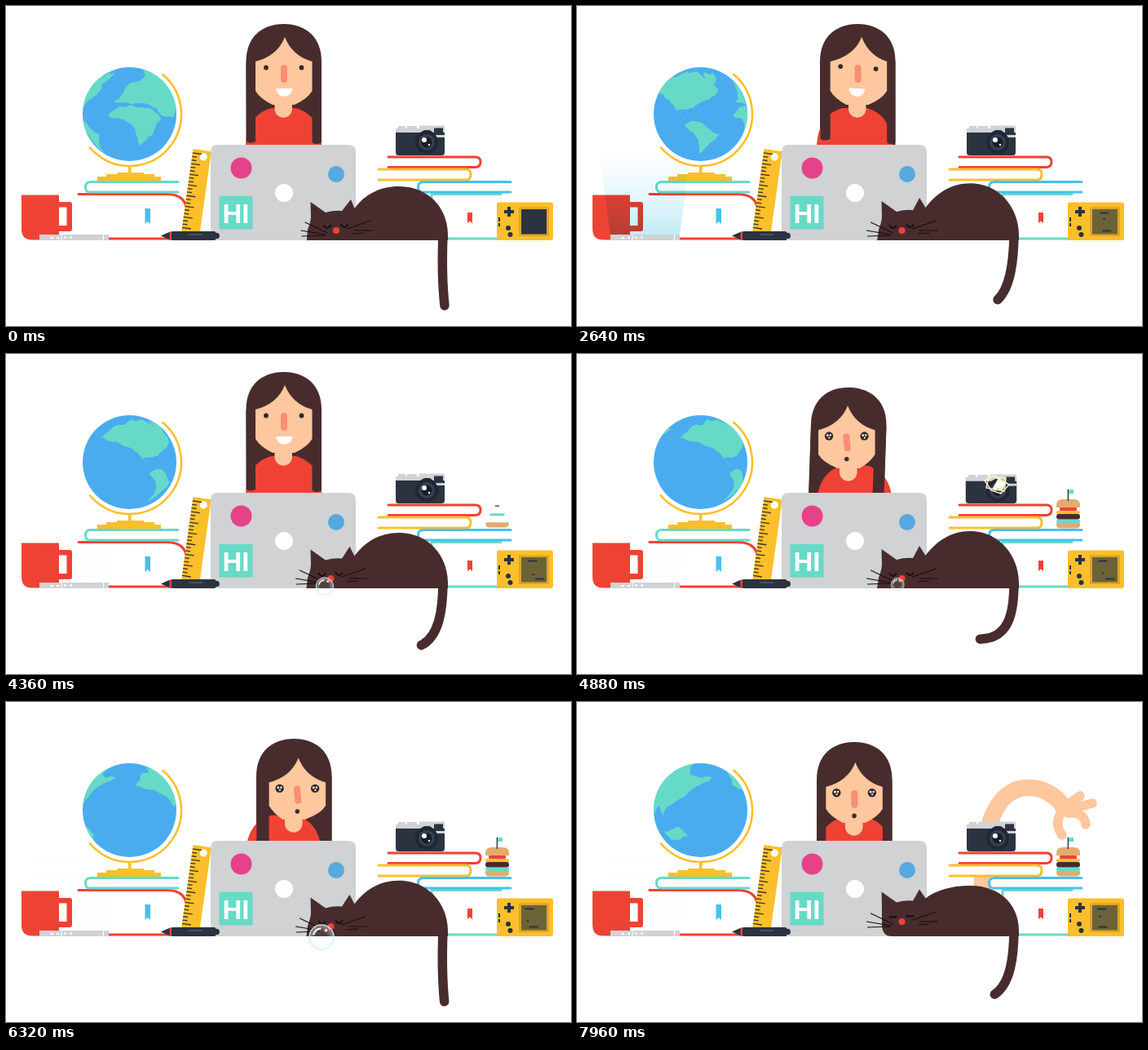
An HTML page for the animation above (8 s loop, 693 px wide and 392 px high).

```html
<!DOCTYPE html>
<html lang="en">
<head>
<meta charset="utf-8">
<title>Desk</title>
<style>
html, body { margin: 0; height: 100%; overflow: hidden; background: #fff; }
svg { display: block; width: 100vw; height: 100vh; }
.red { fill: #ef4234 } .teal { fill: #67dac7 } .gold { fill: #fbbf2b }
.ink { fill: #2b3341 } .grey { fill: #d0d2d4 } .hair { fill: #482c2d }
.skin { fill: #fec79d } .bun { fill: #e4ab6e } .white { fill: #fff }
.book { fill: #fff; stroke-width: 3; stroke-linecap: round }
.limb { fill: none; stroke: #fec79d; stroke-linecap: round; stroke-linejoin: round }
.line { fill: none; stroke: #150d0f; stroke-width: 1.1; stroke-linecap: round }
.lid { stroke-width: 2 }
#beam { mix-blend-mode: multiply }
</style>
</head>
<body>
<svg viewBox="0 0 693 392">
  <defs>
    <linearGradient id="glow" x1="0" y1="0" x2="0" y2="1">
      <stop offset="0" stop-color="#d8f3fb" stop-opacity="0"/>
      <stop offset=".5" stop-color="#cdeffa" stop-opacity=".5"/>
      <stop offset="1" stop-color="#b9e8f6" stop-opacity=".85"/>
    </linearGradient>
    <radialGradient id="film">
      <stop offset=".45" stop-color="#fff" stop-opacity=".08"/>
      <stop offset="1" stop-color="#e4f6fb" stop-opacity=".5"/>
    </radialGradient>
    <clipPath id="above"><path d="M400 0H693V229H400Z"/></clipPath>
  </defs>

  <!-- globe -->
  <circle cx="151.5" cy="132.5" r="57.5" fill="#4aacee"/>
  <path id="land" class="teal" transform="translate(151.5 132.5)"/>
  <circle r="63.5" transform="translate(151.5 132.5) rotate(-51)" pathLength="360" stroke-dasharray="192 168" fill="none" stroke="#fbbf2b" stroke-width="2.6"/>
  <path class="gold" d="M150 196H153.500V204H169V206H182V209H190V214H112V209H123V206H136V204H150Z"/>

  <!-- left books -->
  <path class="book" stroke="#ef4234" d="M89 230.500H198Q222 231 222 254V270Q222 285 200 285H44"/>
  <path class="book" stroke="#67dac7" d="M211 215.500H104Q97.500 215.500 97.500 222T104 228H211"/>
  <path fill="#45c1ef" d="M170.500 248H177V267L173.700 264L170.500 267Z"/>

  <!-- arm -->
  <g clip-path="url(#above)"><g id="arm">
    <path class="limb" stroke-width="20.500" d="M495 280L497 215Q499 168 507 146C517 118 533 105 553 105C574 105 588 115 598 130"/>
    <path class="limb" stroke-width="11.500" d="M597 129L617 115M602 132L632 124M596 132Q584 148 595 163M602 136Q622 134 624 150"/>
  </g></g>

  <!-- right books -->
  <path class="book" stroke="#67dac7" d="M607 230.500H522V285H607"/>
  <path class="book" stroke="#ef4234" d="M469 185H576Q582 185 582 191T576 197.500H469"/>
  <path class="book" stroke="#fbbf2b" d="M457 200H564Q570 200 570 206.500T564 213H457"/>
  <path class="book" stroke="#45c1ef" d="M619 215.500H512Q505.500 215.500 505.500 222T512 228H619"/>
  <path class="red" d="M566 253H572V266L569 263.500L566 266Z"/>

  <!-- camera -->
  <g id="camera">
    <path class="grey" d="M478 150H481V147H490V150H492V147H504V150H507V146.500H538V183H478Z"/>
    <path class="ink" d="M478 155H508L513 152H520L524 155H538V179Q538 183 534 183H482Q478 183 478 179ZM525 149.500H536V158H525Z"/>
    <path class="grey" d="M524 158H538V161H524Z"/>
    <circle cx="516" cy="167" r="14" fill="#1f2733"/>
    <circle cx="516" cy="167" r="10" fill="#36404f"/>
    <circle cx="516" cy="167" r="6.500" fill="#171d27"/>
    <circle class="white" cx="513" cy="164" r="3"/>
    <circle class="white" cx="519" cy="170" r="1.200"/>
  </g>
  <g id="flash" fill="none" stroke="#fdeec9" stroke-width="1.500">
    <path d="M500 155L512 149L530 160L520 171L508 167Z"/>
    <path d="M505 150L526 152L524 168L502 164Z"/>
    <path d="M517 153L526 158L521 167L512 162Z" fill="#fff"/>
  </g>

  <!-- burger -->
  <g id="burger">
    <path class="bun" d="M588 207H617V209Q617 213.500 612 213.500H593Q588 213.500 588 209Z"/>
    <rect class="teal" x="588" y="202.500" width="29" height="4.500" rx="2"/>
    <rect class="hair" x="588" y="196" width="29" height="6.500" rx="3"/>
    <rect class="gold" x="588" y="192" width="29" height="4" rx="1.500"/>
    <rect class="red" x="592" y="188" width="21" height="4" rx="1"/>
    <path class="bun" d="M588 188V185Q588 178 596 178H609Q617 178 617 185V188Z"/>
    <path class="teal" d="M602 166H609V171H603.300V179H602Z"/>
    <path class="ink" d="M601.700 166H603V180H601.700Z"/>
  </g>

  <!-- handheld game -->
  <path class="gold" d="M604 240.500H669Q671 240.500 671 243V284Q671 287 668 287H602V243Q602 240.500 604 240.500Z"/>
  <path fill="#dba626" d="M629 246.500H666V282H629Z"/>
  <path id="screen" class="ink" d="M632 249H663V279.500H632Z"/>
  <g id="game" class="ink">
    <rect y="252.500" width="11" height="2"/>
    <rect y="274.500" width="11" height="2"/>
    <rect width="2.500" height="2"/>
  </g>
  <path class="ink" d="M615 246H619V250H623V254H619V258H615V254H611V250H615ZM604 259H606V264H604ZM604 266H606V270H604Z"/>
  <circle class="ink" cx="616" cy="272" r="3"/><circle class="ink" cx="618.500" cy="280" r="3"/>

  <!-- mug, projector -->
  <path class="red" d="M19 231.500H65V240H78Q81 240 81 243V273Q81 276 78 276H65V286.500H32Q19 286.500 19 273ZM65 246.500V269H74.500V246.500Z"/>
  <path id="beam" fill="url(#glow)" d="M27 182H139L126 280H41Z"/>
  <path class="grey" d="M41 280H126V287H41Z"/>
  <path class="white" d="M67.500 280H68.500V287H67.500ZM119 280H120V287H119ZM54 283H58V285H54ZM62 283H65V285H62ZM71 282.500H74V284.500H71ZM78 282.500H81V284.500H78Z"/>

  <!-- ruler -->
  <g transform="translate(229.500 175) rotate(8)">
    <path class="gold" d="M0 0H22.500V102H0Z"/>
    <circle class="white" cx="14" cy="8" r="4.600"/>
    <path id="ticks" fill="none" stroke="#3b302b" stroke-width="1.300"/>
  </g>

  <!-- woman -->
  <path id="back" class="hair" d="M294.500 185V68C294.500 38 314 22 340.700 22S387 38 387 68V185Z"/>
  <path id="shirt" class="red" d="M294 200V172C295 146 306 130 326 125H355C375 130 386 146 387 172V200Z"/>
  <path id="neck" class="skin" d="M329.500 98H351V126A10.750 10.750 0 0 1 329.500 126Z"/>
  <path id="strands" class="hair"/>
  <path id="skin" class="skin"/>
  <g id="face">
    <g id="dots" fill="#33292c"><circle cx="319" cy="75.500" r="2.900"/><circle cx="362.500" cy="75.500" r="2.900"/></g>
    <path id="happy" fill="none" stroke="#33292c" stroke-width="2.200" stroke-linecap="round" d="M313.500 78C314 70 324 70 324.500 78M357 78C357.500 70 367.500 70 368 78"/>
    <g id="wide"></g>
    <rect id="nose" x="337" y="72" width="8" height="22" rx="4" fill="#f98d76"/>
    <path id="smile" class="white" d="M331.500 101H351C351 114 331.500 114 331.500 101Z"/>
    <circle id="gasp" cx="340.700" cy="103.500" r="2.800" fill="#482c2d"/>
  </g>

  <!-- laptop -->
  <path class="grey" d="M251 287V179Q251 170 260 170H420Q429 170 429 179V287Z"/>
  <circle cx="288.500" cy="198.500" r="13" fill="#e6428a"/>
  <circle cx="405" cy="206" r="10" fill="#55a9de"/>
  <circle class="white" cx="341" cy="229" r="11"/>
  <path class="teal" d="M261.500 233H302.500V273.500H261.500Z"/>
  <text x="282" y="265.500" text-anchor="middle" class="white" font-family="'Liberation Sans', Arial, sans-serif" font-weight="700" font-size="33">HI</text>

  <!-- marker -->
  <path class="ink" d="M190 281.500L200 277L205 276H256L258 278H260Q262 279 262 281.500T260 285H258L256 287H205L200 286Z"/>
  <path class="red" d="M200.500 276.800H203V286.600H200.500Z"/>
  <path fill="#465061" d="M224 279H241V281H224Z"/>

  <!-- cat -->
  <path id="tail" fill="none" stroke="#482c2d" stroke-width="11.500" stroke-linecap="round"/>
  <path id="cat" class="hair"/>
  <g id="muzzle">
    <path class="line" d="M-43 0L-14 5M-38-10L-11 3M-42 7L-14 6M13-2L42-12M22 0H44M20 4L33 3"/>
    <path id="lids" class="line lid"/>
    <circle class="red" r="4"/>
  </g>
  <g id="bubble">
    <circle r="1" fill="url(#film)" stroke="#c9edf7" stroke-width=".08"/>
    <path d="M-.65-.25Q-.5-.65-.1-.7" fill="none" stroke="#fff" stroke-width=".14" stroke-linecap="round"/>
    <circle class="white" cx=".35" cy="-.55" r=".12"/>
  </g>
</svg>
<script>
const LOOP = 8000;
const $ = id => document.getElementById(id);
const put = (id, name, value) => $(id).setAttribute(name, value);
const move = (id, value) => put(id, 'transform', value);
const show = (id, on) => $(id).style.display = on ? '' : 'none';
const clamp = (v, low, high) => Math.max(low, Math.min(high, v));

// Eased 0 to 1 between two times, and an eased rise and fall.
function step(t, from, to) {
  const k = clamp((t - from) / (to - from), 0, 1);
  return k * k * (3 - 2 * k);
}
const pulse = (t, from, peak, to) => step(t, from, peak) - step(t, peak, to);

let seed = 7;
function random() {
  seed = (seed * 16807) % 2147483647;
  return seed / 2147483647;
}

// Splits each edge and nudges its middle, for a ragged coast.
function roughen(points, depth) {
  if (!depth) return points;
  const split = points.flatMap(([x, y], i) => {
    const [nx, ny] = points[(i + 1) % points.length];
    const amount = Math.hypot(nx - x, ny - y) * .24;
    return [[x, y], [(x + nx) / 2 + (random() - .5) * amount, (y + ny) / 2 + (random() - .5) * amount]];
  });
  return roughen(split, depth - 1);
}

// Key corners of each land: degrees east, height on the disc.
const lands = [
  'M-162-30 -148-44 -75-50 -45-32 -80-8 -102-4 -90 8 -133-24',
  'M-92 14 -74 9 -44 24 -73 48',
  'M-28 2 -14-9 27-7 42 6 16 39 5 16',
  'M-20-15 0-38 40-50 165-40 118-14 92 6 80-6 66 4 44 2 22-13',
  'M84 26 116 20 128 31 92 36',
  'M-66-50 -38-50 -52-34'
].map(text => {
  const n = text.match(/-?\d+/g).map(Number);
  const corners = n.filter((_, i) => i % 2 === 0).map((lon, i) => [lon, n[2 * i + 1]]);
  return roughen(corners, 4);
});

function landPath(points, turn) {
  const angles = points.map(p => p[0] + turn);
  if (Math.max(...angles) < -90 || Math.min(...angles) > 90) return '';
  return 'M' + points.map(([, y], i) => {
    const half = Math.sqrt(Math.max(0, 57.5 ** 2 - y * y));
    const x = half * Math.sin(clamp(angles[i], -90, 90) * Math.PI / 180);
    return x.toFixed(1) + ' ' + y.toFixed(1);
  }).join('L') + 'Z';
}

function globe(t) {
  const turn = t * .027;
  put('land', 'd', lands.map(l => landPath(l, turn) + landPath(l, turn - 360)).join(''));
}

function woman(t) {
  const tilt = step(t, 950, 1250) - step(t, 2660, 2960);
  const slump = step(t, 4380, 4680), sway = step(t, 5940, 6240), settle = step(t, 6800, 7250);
  const x = 3.5 * tilt - 7.5 * slump + 20 * sway - 13 * settle;
  const y = 19 * slump + 4 * sway + 4 * settle;
  const fx = 1.33 * x, fy = 1.33 * y;
  const hair = `translate(${x} ${y}) rotate(${2 * (slump - sway)} 341 68)`;
  move('back', hair);
  move('strands', hair);
  move('shirt', `translate(0 ${y * .6})`);
  move('neck', `translate(${x} ${y})`);

  const left = 306 + fx, right = 375.5 + fx, top = 68 + fy, jaw = 104 + y, chin = 121 + y;
  put('strands', 'd', `M294.500 68H${left - x}V${166 - 3 * tilt}Q300 ${169 - 3 * tilt} 295 ${166 - 3 * tilt}ZM387 68H${right - x}V167Q380 171 387 167Z`);
  const part = 342 + fx + 2.5 * tilt;
  put('skin', 'd', `M${part} ${38 + fy}Q${part - 9} ${top - 7} ${left} ${top}V${jaw}Q${left + 6} ${jaw + 10} ${327 + x} ${chin}
    H${354 + x}Q${right - 6} ${jaw + 10} ${right} ${jaw}V${top}Q${part + 9} ${top - 7} ${part} ${38 + fy}Z`);
  move('face', `translate(${fx - 2.6 * tilt} ${fy}) rotate(${4 * tilt} 341 105)`);
  move('nose', `rotate(${-4 * tilt - 5 * (slump - settle)} 341 83)`);

  const stunned = t >= 4480;
  const glad = (t > 3240 && t < 4200) || (t > 2000 && t < 2120);
  show('dots', !stunned && !glad);
  show('happy', glad);
  show('wide', stunned);
  show('smile', !stunned);
  show('gasp', stunned);
}

function cat(t) {
  const swing = pulse(t, 1250, 2080, 3200) + pulse(t, 3700, 4800, 6400) + pulse(t, 6700, 7450, 8600);
  put('tail', 'd', `M536 280C${535 + swing} ${305 + 14 * swing} ${535 - 6 * swing} ${340 + 9 * swing}
    ${538 - 44 * swing} ${367 - 18 * swing ** 1.3}`);

  const lift = step(t, 7100, 7700);
  const breath = pulse(t, 1000, 2450, 3850) + pulse(t, 3850, 4880, 5900) + pulse(t, 5900, 6700, 7300);
  const up = 7.5 * lift + breath, peak = 221 - 4 * breath + 4 * lift;
  put('cat', 'd', `M${369 + 17 * lift - breath} 287Q${369 + 6 * lift} ${282 + 5 * lift} ${370 + 4 * lift} 274
    Q374 264 374 ${258 - up}L373.500 ${240 - up}L392 ${253 - up}Q402 ${250 - up} 412 ${251 - up}
    L${423 - 3 * Math.max(breath, lift)} ${237 - up - breath}L427.500 ${248 - up}
    C440 ${231 - breath} 458 ${peak} 482 ${peak}C518 ${peak} 542 247 542 281V287Z`);

  move('muzzle', `translate(${405 - 6.5 * step(t, 1000, 2400)} ${275 - 6 * lift})`);
  const sag = 5 * (1 - lift);
  put('lids', 'd', `M-15-6q4 ${1 + sag} 8 0M6-7q4 ${1 + sag} 8 0`);

  const r = 13 * step(t, 2700, 3900) - 5 * step(t, 3900, 4880) + 8 * step(t, 4880, 6680);
  show('bubble', t > 2720 && t < 6680);
  move('bubble', `translate(${400 - r * .85} ${276 + r * .8}) scale(${r})`);
}

function game(t) {
  const on = t > 1800;
  const drift = peak => Math.cos(Math.PI * (t - peak) / 3300);
  $('screen').style.fill = on ? '#6b6238' : '';
  show('game', on);
  const [top, foot, ball] = $('game').children;
  top.setAttribute('x', 639 + 2.5 * drift(3300));
  foot.setAttribute('x', 644 + 5 * drift(4200));
  ball.setAttribute('x', 642.5 + 4.5 * drift(3600));
  ball.setAttribute('y', 256 + 15 * Math.abs((t + 160) / 320 % 2 - 1));
}

function props(t) {
  put('beam', 'opacity', step(t, 400, 950) - .95 * step(t, 2640, 3500));

  [...$('burger').children].forEach((part, i) => {
    const start = 4200 + 55 * i, k = step(t, start, start + 180);
    part.setAttribute('transform', `translate(602.500 ${183 + 30 * k}) scale(${k}) translate(-602.500 -213)`);
  });

  const flash = t > 4800 && t < 5000;
  show('flash', flash);
  move('flash', `rotate(${(t - 4880) * .1} 516 161)`);
  move('camera', flash ? 'translate(508 183) scale(1.04 .97) translate(-508 -183)' : '');

  show('arm', t > 7440);
  move('arm', `translate(0 ${145 - 185 * step(t, 7440, 7740) + 40 * step(t, 7740, 7960)})`);
}

put('ticks', 'd', Array.from({ length: 22 }, (_, i) => `M0 ${5 + i * 4.4}H${i % 3 ? 6 : 11}`).join(''));
$('wide').innerHTML = [319, 362.5].map(x => `<g transform="translate(${x} 75.300)">
  <circle r="5.200" fill="#33292c"/><circle class="white" cx="-1.800" cy="-1" r="1.400"/>
  <circle class="white" cx="1.800" cy="-1.200" r="1.200"/><circle class="white" cx=".3" cy="2" r="1.100"/></g>`).join('');

const start = performance.now();
function frame(now) {
  const t = Math.max(0, now - start) % LOOP;
  [globe, woman, cat, game, props].forEach(draw => draw(t));
  requestAnimationFrame(frame);
}
frame(start);
</script>
</body>
</html>
```
